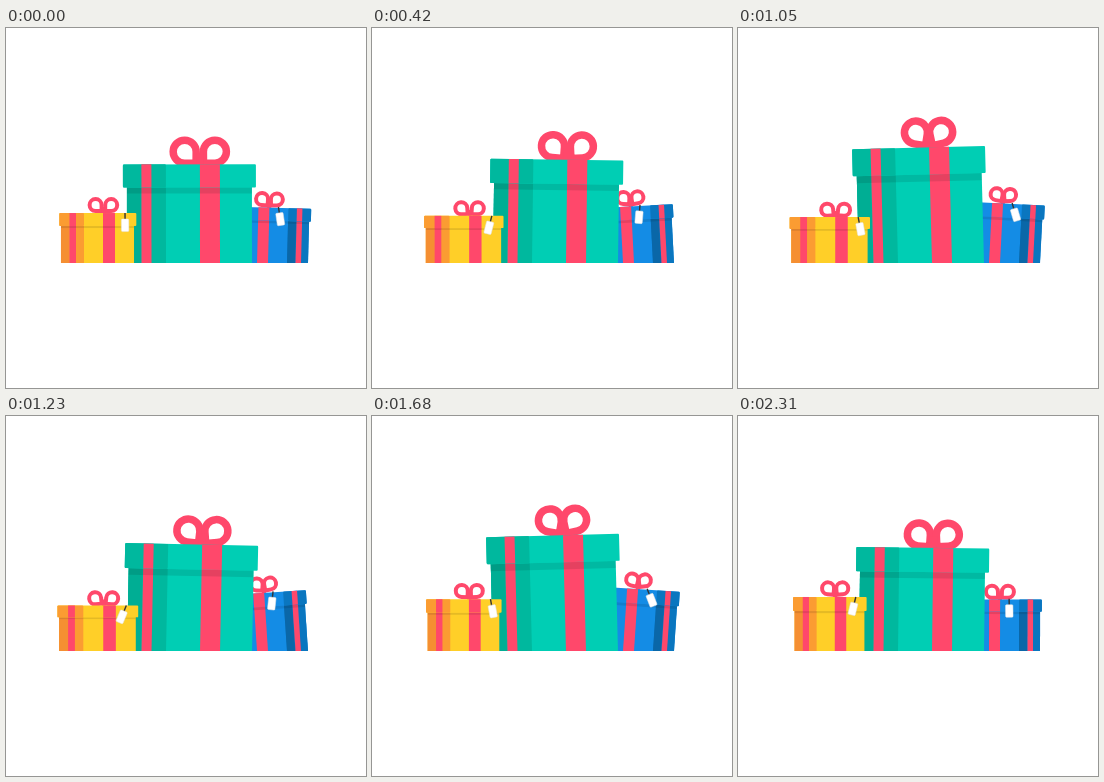
An HTML page for the animation above (2340 ms loop, 360 by 360 pixels).

```html
<!DOCTYPE html>
<html lang="en">
<head>
<meta charset="utf-8">
<title>Bouncing gifts</title>
<style>
  html, body { margin: 0; width: 100%; height: 100%; overflow: hidden; background: #fff; }
  svg { display: block; width: 100vw; height: 100vh; }
</style>
</head>
<body>
<svg id="stage" viewBox="0 0 360 360"></svg>
<script>
const BASE = 235, HALF = 390, LOOP = 2340;
const RED = '#ff486b';
const stage = document.getElementById('stage');

const rect = (x0, x1, y0, y1, fill, extra = '') =>
  `<rect x="${x0}" y="${y0}" width="${x1 - x0}" height="${y1 - y0}" fill="${fill}" ${extra}/>`;

// A ring with one square corner, placed relative to the knot at 0,0.
const loop = (r, width, dx, dy) =>
  `<path class="loop" d="M${r} ${r}V0A${r} ${r} 0 1 0 0 ${r}Z" transform="translate(${-dx} ${-dy})"
    fill="none" stroke="${RED}" stroke-width="${width}"/>`;

const TAG = `<path d="M0 0v7" stroke="#333" stroke-width="1.4"/>
  ${rect(-3.7, 3.7, 6, 18.5, '#fff', 'rx="1" stroke="#e4e4e4" stroke-width=".5"')}`;

function makeGift(g) {
  const [lx0, lx1, top, rim] = g.lid, [bx0, bx1] = g.body, [sx0, sx1] = g.side;
  const ribbons = (y0, y1) => g.ribbons.map(([a, b]) => rect(a, b, y0, y1, RED)).join('');
  const lidSide = sx0 === bx0 ? [lx0, sx1] : [sx0, lx1];
  const mid = (top + rim) / 2;
  const [knotX, dx, dy, r, width] = g.bow;
  const root = document.createElementNS('http://www.w3.org/2000/svg', 'g');
  root.innerHTML = `
    <g class="body">
      ${rect(bx0, bx1, mid, BASE, g.main)}
      ${rect(sx0, sx1, mid, BASE, g.shade)}
      ${rect(...g.edge, mid, BASE, g.dark)}
      ${ribbons(mid, BASE)}
    </g>
    <g class="lid">
      <g class="bow">
        <g class="left">${loop(r, width, dx, dy)}</g>
        <g class="right">${loop(r, width, dx, dy)}</g>
        ${rect(-width / 2, width / 2, -r, 1, RED)}
      </g>
      ${rect(bx0, bx1, rim, rim + g.shadow, '#000', 'opacity=".1"')}
      ${rect(lx0, lx1, top, rim, g.main, 'rx="1"')}
      ${rect(...lidSide, top, rim, g.shade, 'rx="1"')}
      ${ribbons(top, rim)}
      ${g.tag ? `<g class="tag">${TAG}</g>` : ''}
    </g>`;
  stage.append(root);

  const set = (name, value) => root.querySelector('.' + name)?.setAttribute('transform', value);

  return (angle, sx, sy, swing = 0) => {
    const place = turn =>
      `translate(${g.pivot} ${BASE}) ${turn} scale(${sx} ${sy}) translate(${-g.pivot} ${-BASE})`;
    // Bow and tag ride on the lid but keep their own size.
    const keepSize = (x, y) => `translate(${x} ${y}) scale(${1 / sx} ${1 / sy})`;
    const fold = 60 * (sy - 1);
    set('body', place(`skewX(${-angle})`));
    set('lid', place(`rotate(${angle})`));
    set('bow', keepSize(knotX, top));
    set('left', `rotate(${fold})`);
    set('right', `scale(-1 1) rotate(${fold})`);
    if (g.tag) set('tag', `${keepSize(...g.tag)} rotate(${swing})`);
  };
}

const blue = makeGift({
  pivot: 274, lid: [236, 303.8, 182.3, 194.7], body: [236, 302], side: [281, 302], edge: [281, 289],
  ribbons: [[251, 262], [289.5, 295]], bow: [261.8, 7.8, 8, 6, 4],
  main: '#148ce5', shade: '#0a76bf', dark: '#0a67a8', shadow: 2.5, tag: [271, 181.5]
});
const green = makeGift({
  pivot: 184, lid: [117, 250, 137, 160], body: [121, 246], side: [121, 160], edge: [121, 135],
  ribbons: [[135.5, 145.5], [194, 214]], bow: [193.9, 15.2, 12.5, 11.5, 7.5],
  main: '#00ceb4', shade: '#00b89e', dark: '#00ae94', shadow: 6
});
const yellow = makeGift({
  pivot: 92, lid: [53.3, 130.3, 185, 198], body: [55, 128], side: [55, 78], edge: [55, 63.5],
  ribbons: [[63.5, 70], [97, 109]], bow: [97.4, 7.8, 8, 6, 4],
  main: '#ffcf28', shade: '#fb9c32', dark: '#f58f32', shadow: 2, tag: [119, 185]
});

// Alternating hops: height of the hop and whether it is the first of a pair.
function hop(t) {
  const u = t % (2 * HALF);
  return { lift: Math.sin(Math.PI * (u % HALF) / HALF) ** 0.7, first: u < HALF };
}

function draw(t) {
  const g = hop(t), b = hop(t + 30);
  green(g.lift * (g.first ? -1.7 : 2), 1, 1 + g.lift * (g.first ? 0.205 : 0.148));
  blue(b.lift * (b.first ? 4 : -5), 1, 0.97 + 0.2 * b.lift, b.lift * (b.first ? -26 : 13));

  const beat = t % (HALF / 2) / (HALF / 2);
  const squash = 0.09 * Math.sin(2 * Math.PI * beat ** 1.2);
  yellow(0, 1 + 0.55 * squash, 1 - squash, g.lift * (g.first ? -12 : 38));
}

const start = performance.now();
function tick() {
  draw((performance.now() - start) % LOOP);
  requestAnimationFrame(tick);
}
tick();
</script>
</body>
</html>
```
